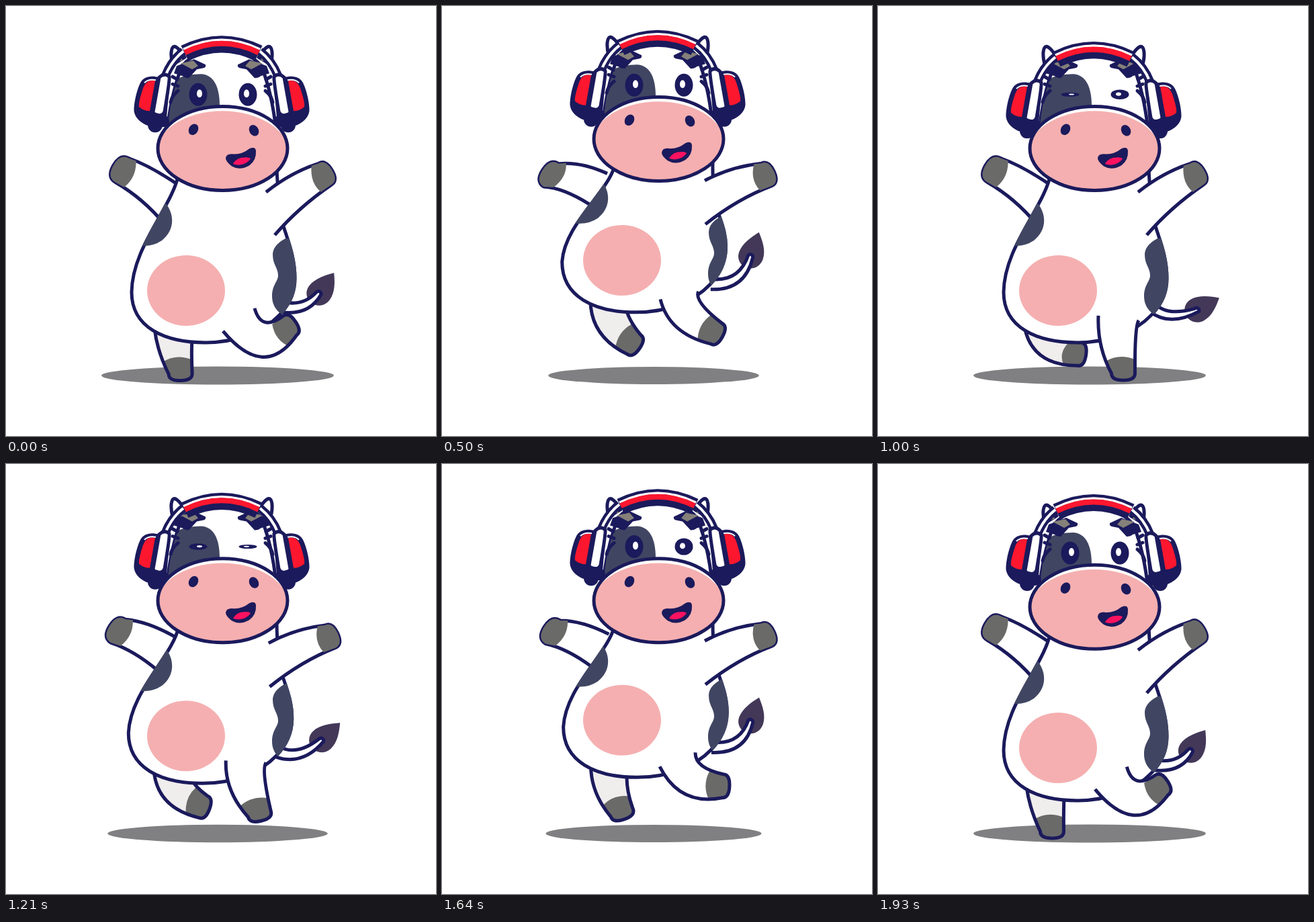
Animation, 640 px wide and 640 px high, one loop 2000 ms. Source, as an HTML page:

```html
<!DOCTYPE html>
<html lang="en">
<head>
<meta charset="utf-8">
<title>Dancing cow</title>
<style>
  html, body { margin: 0; width: 100%; height: 100%; overflow: hidden; background: #fff; }
  svg { display: block; width: 100%; height: 100%; }
  .line { stroke: #1b1a5c; stroke-width: 5; stroke-linejoin: round; }
  .navy { fill: #1b1a5c; }
  .white { fill: #fff; }
  .none { fill: none; }
  .pink { fill: #f5afb0; }
  .red { fill: #fc172f; }
  .patch { fill: #404662; }
  .coat { fill: #404662; stroke: #404662; stroke-width: 5; }
  .hoof { fill: #6a6a69; }
  .horn { fill: #858079; }
</style>
</head>
<body>
<svg viewBox="0 0 640 640">
  <defs>
    <path id="body"/>
    <clipPath id="coatClip">
      <path id="coatShape" d="M238 294C252 312 250 335 232 349Q220 357 206 357H150V294Z
        M416 346Q397 356 397 370C397 385 405 390 405 401C405 410 396 415 396 432Q396 448 409 458H450V346Z"/>
    </clipPath>
    <clipPath id="muzzleClip"><ellipse cx="322.5" cy="212.7" rx="97" ry="63"/></clipPath>
    <g id="horn">
      <path class="white line" d="M248 88C244 72 246 61 251 61C256 62 261 69 266 77Z"/>
      <path class="horn" d="M252 84Q253 74 260 74L263 82Z"/>
    </g>
    <g id="tuft">
      <path class="navy" d="M254 90L280 80L297 88Q298 92 294 93L284 95L272 108Q266 108 263 105L250 101Z"/>
      <path class="horn" d="M260 86L279 82L286 90L277 95Z"/>
      <path class="line none" stroke-linecap="round" d="M248 106l7 4M248 117l8 3M256 127q-9 7-11 17"/>
    </g>
    <g id="cup">
      <circle class="navy" cx="222" cy="178" r="11"/>
      <circle class="navy" cx="234" cy="172" r="9"/>
      <path class="navy" d="M228 107C214 103 204 107 200 115C194 127 190 147 190.5 157C192 168 202 176 212 179L238 178L244 110Z"/>
      <path class="red" d="M222 112C212 110 207 115 204 123C200 135 197 146 198 151Q205 157 214 157Z"/>
      <path class="none" stroke="#fff" stroke-width="2" d="M206 115Q212 109 223 111"/>
      <path class="white line" d="M228 107Q236 99 243 106Q244 110 236 158Q233 165 226 163Q219 162 219 158Z"/>
    </g>
    <g id="eye">
      <ellipse class="navy" rx="13.5" ry="17"/>
      <ellipse class="white" cx="2" cy="-1.5" rx="4" ry="6"/>
    </g>
  </defs>

  <ellipse id="shadow" cx="315" cy="550" fill="#808082"/>
  <path id="tailTip" fill="#433858" d="M0-38C9-28 19-16 19-2C19 10 10 18 0 18C-10 18-18 10-18 0C-18-14-8-28 0-38Z"/>
  <path id="tail" class="white line"/>
  <g id="farLeg"><path fill="#f0eded"/><path class="hoof"/><path class="line none"/></g>
  <g id="leftArm"><path class="white"/><path class="line none"/><path class="hoof"/></g>
  <use href="#body" class="white line"/>
  <g clip-path="url(#coatClip)"><use href="#body" class="coat"/></g>
  <ellipse id="belly" class="pink" cx="268" cy="423.7" rx="58" ry="52.5"/>
  <g id="nearLeg"><path class="white"/><path class="hoof"/><path class="line none"/></g>
  <g id="rightArm"><path class="white"/><path class="line none"/><path class="hoof"/></g>

  <g id="head">
    <path class="white line" d="M240 186Q246 130 262 90Q285 64 321 64Q357 64 380 90Q396 130 402 186Z"/>
    <path class="patch" d="M241 180Q245 135 257 108Q270 102 290 102C309 103 318 120 318 150V180Z"/>
    <use href="#horn"/><use href="#horn" transform="matrix(-1 0 0 1 642 0)"/>
    <use href="#tuft"/><use href="#tuft" transform="matrix(-1 0 0 1 642 0)"/>
    <use id="leftEye" href="#eye"/><use id="rightEye" href="#eye"/>
  </g>
  <g id="phones">
    <path class="none" stroke="#1b1a5c" stroke-width="13" d="M237 105Q246 82 264 68M378 68Q396 82 405 105"/>
    <path class="none" stroke="#fff" stroke-width="4" d="M237 105Q246 82 264 68M378 68Q396 82 405 105"/>
    <path class="none" stroke="#1b1a5c" stroke-width="25" d="M266 71Q321 44 376 71"/>
    <path class="none" stroke="#fff" stroke-width="3.5" d="M264 65Q321 37 378 65"/>
    <path class="none" stroke="#fc172f" stroke-width="8" d="M266 70Q321 43 376 70"/>
    <use href="#cup"/><use href="#cup" transform="matrix(-1 0 0 1 642 0)"/>
  </g>
  <g id="muzzle">
    <ellipse class="white" cx="322.5" cy="212.7" rx="97" ry="63"/>
    <ellipse class="pink" cx="322" cy="222" rx="100" ry="65" clip-path="url(#muzzleClip)"/>
    <ellipse class="line none" cx="322.5" cy="212.7" rx="96.5" ry="62.5"/>
    <ellipse class="navy" rx="6.8" ry="8.7" transform="translate(279 184.5) rotate(30)"/>
    <ellipse class="navy" rx="6.8" ry="8.7" transform="translate(369 186) rotate(-30)"/>
  </g>
  <g id="mouth">
    <path class="navy" d="M327 227Q328 219 340 221Q352 221 362 213Q371 209 372 216Q373 230 362 238Q348 246 336 239Q327 232 327 227Z"/>
    <path fill="#fc1260" d="M338 235Q344 226 354 226Q362 225 364 228Q358 236 348 237Q340 237 338 235Z"/>
  </g>
</svg>

<script>
const STEPS = 28, LOOP = 2000, BOUNCE = 43.5;
const { PI, sin, cos, abs, min, max, hypot, floor, round } = Math;
const $ = id => document.getElementById(id);
const set = (id, attrs) => { for (const a in attrs) $(id).setAttribute(a, attrs[a]); };
const shift = (id, y) => set(id, { transform: `translate(0 ${y})` });
const clamp = (v, lo, hi) => min(hi, max(lo, v));
const mix = (a, b, w) => a.map((v, i) => v + (b[i] - v) * w);

// Parabola from a to b that passes m at the given progress.
const arc = (a, m, b, at) => s => a.map((v, i) => {
  const span = b[i] - v, bend = (m[i] - v - span * at) / (at * at - at);
  return v + s * (span - bend + bend * s);
});

// Rules of motion; the figure hops twice per loop and swaps legs once.
const turn = k => 2 * PI * k / STEPS;
const swing = k => (1 - cos(turn(k))) / 2;
const hop = k => 1.08 * abs(sin(turn(k + .5))) ** 1.6 - .03;
const nod = k => -15.5 * sin(turn(k + 1)) ** 2;
const jiggle = k => 11 * sin(2 * turn(k)) * max(0, -sin(turn(k)));
const wag = k => 34.5 - 12.5 * cos(turn(k)) + 15 * cos(2 * turn(k));
const lid = (k, shut) => clamp(.13 * abs(k - shut), .18, 1);

// Limb pose: hip, knee, foot, foot angle, back knee, back hip.
const farLeg = arc(
  [221, 480, 225, 512, 259, 557, 0, 276, 520, 277, 495],
  [221, 479, 219, 536, 294, 555, -55, 276, 511, 273, 491],
  [218, 478, 230, 535, 310, 518, -82, 290, 502, 272, 490], .61);
const nearLeg = arc(
  [328, 461, 326, 507, 365, 557, 0, 382, 477, 388, 468],
  [324, 485, 354, 544, 428, 514, -88, 376, 487, 377, 464],
  [323, 484, 385, 558, 431, 470, -124, 380, 486, 370, 450], .72);
const leftArm = w => mix(
  [256, 266, 215, 238, 160, 237, 120, 205, 287, 236, 325],
  [250, 256, 210, 234, 154, 241, 122, 190, 277, 226, 307], w);
const rightArm = w => mix(
  [400, 341, 435, 300, 485, 244, -121, 425, 247, 387, 277],
  [392, 331, 440, 293, 494, 252, -115, 430, 245, 391, 266], w);

const LEG = { width: 17.5, depth: 10, front: 20, back: 21 };
const LEFT = { width: 20.5, depth: 15, front: 11, back: 15 };
const RIGHT = { width: 18.5, depth: 12, front: 19, back: 11 };

const BODY = 'M258 245C250 298 188 356 187 426C187 478 235 501 297 501C345 501 384 484 407 460' +
  'C424 442 430 425 430 405C430 375 420 350 413 328C407 300 404 275 403 240';

function toward(from, to, dist) {
  const dx = to[0] - from[0], dy = to[1] - from[1], len = hypot(dx, dy) || 1;
  return [from[0] + dx / len * dist, from[1] + dy / len * dist];
}

function drawLimb(id, [hx, hy, kx, ky, fx, fy, angle, bx, by, ex, ey], { width, depth, front, back }) {
  const c = cos(angle * PI / 180), s = sin(angle * PI / 180);
  const foot = (x, y) => [fx + x * c - y * s, fy + x * s + y * c];
  const heel = foot(-width, -depth), toe = foot(width, -depth), sole = [fx, fy];
  const heelCorner = foot(-width, 0), toeCorner = foot(width, 0);
  const a = toward(heel, [kx, ky], front), b = toward(toe, [bx, by], back);
  const crown = toward(mix(a, b, .5), sole, -11);
  const leg = `M${hx} ${hy}Q${kx} ${ky} ${heel}Q${heelCorner} ${sole}Q${toeCorner} ${toe}Q${bx} ${by} ${ex} ${ey}`;
  const hoof = `M${a}Q${crown} ${b}L${toe}Q${toeCorner} ${sole}Q${heelCorner} ${heel}Z`;
  for (const part of $(id).children) part.setAttribute('d', part.matches('.hoof') ? hoof : leg);
}

// The lower body rises and leans most, the neck least.
function drawBody(rise) {
  const d = BODY.replace(/(\d+) (\d+)/g, (_, x, y) => {
    const t = clamp((y - 240) / 180, 0, 1);
    return `${x - 8 * rise * t} ${y - rise * (8 + (BOUNCE - 8) * t)}`;
  });
  set('body', { d });
}

function drawTail(rise, angle) {
  const bend = angle * angle / 100;
  const bx = 410 - 5 * rise, by = 440 - 32 * rise;
  const cx = bx + 40 - .6 * bend, cy = by + .6 * bend;
  const ex = 452 + .36 * angle, ey = 414 + bend - BOUNCE * rise;
  set('tailTip', { transform: `translate(${ex} ${ey}) rotate(${angle})` });
  set('tail', { d: `M${bx} ${by}Q${cx} ${cy} ${ex - 3} ${ey - 2}` +
    `A4 4 0 0 1 ${ex + 3.5} ${ey + 2}Q${cx + 8} ${cy + 15} ${bx - 5} ${by + 15}` });
}

function draw(k) {
  const rise = hop(k), lift = BOUNCE * rise;
  set('shadow', { rx: 173 - 15.5 * rise, ry: 13.5 - .6 * rise });
  drawBody(rise);
  drawTail(rise, wag(k));
  shift('coatShape', -32 * rise);
  shift('belly', jiggle(k) - lift);

  drawLimb('farLeg', farLeg(swing(k + 1)), LEG);
  drawLimb('nearLeg', nearLeg(1 - swing(k)), LEG);
  drawLimb('leftArm', leftArm(1.6 * rise), LEFT);
  drawLimb('rightArm', rightArm(min(1, 1.6 * rise)), RIGHT);
  shift('farLeg', -lift);
  shift('nearLeg', -lift);
  shift('rightArm', -14 * max(0, rise - .6));

  shift('head', nod(k));
  shift('muzzle', nod(k));
  shift('mouth', .6 * nod(k));
  shift('phones', nod(k) + 9 * swing(k + 1));
  set('leftEye', { transform: `translate(286 132.5) scale(1 ${lid(k, 14.8)})` });
  set('rightEye', { transform: `translate(360 132.5) scale(-1 ${lid(k, 17.3)})` });
}

// Steps begin on whole hundredths of a second.
const startOf = k => round(k * LOOP / STEPS / 10) * 10;
function tick() {
  const t = performance.now() % LOOP;
  let k = floor((t + 4.5) * STEPS / LOOP);
  if (startOf(k) > t) k--;
  draw(k % STEPS);
  requestAnimationFrame(tick);
}
tick();
</script>
</body>
</html>
```
